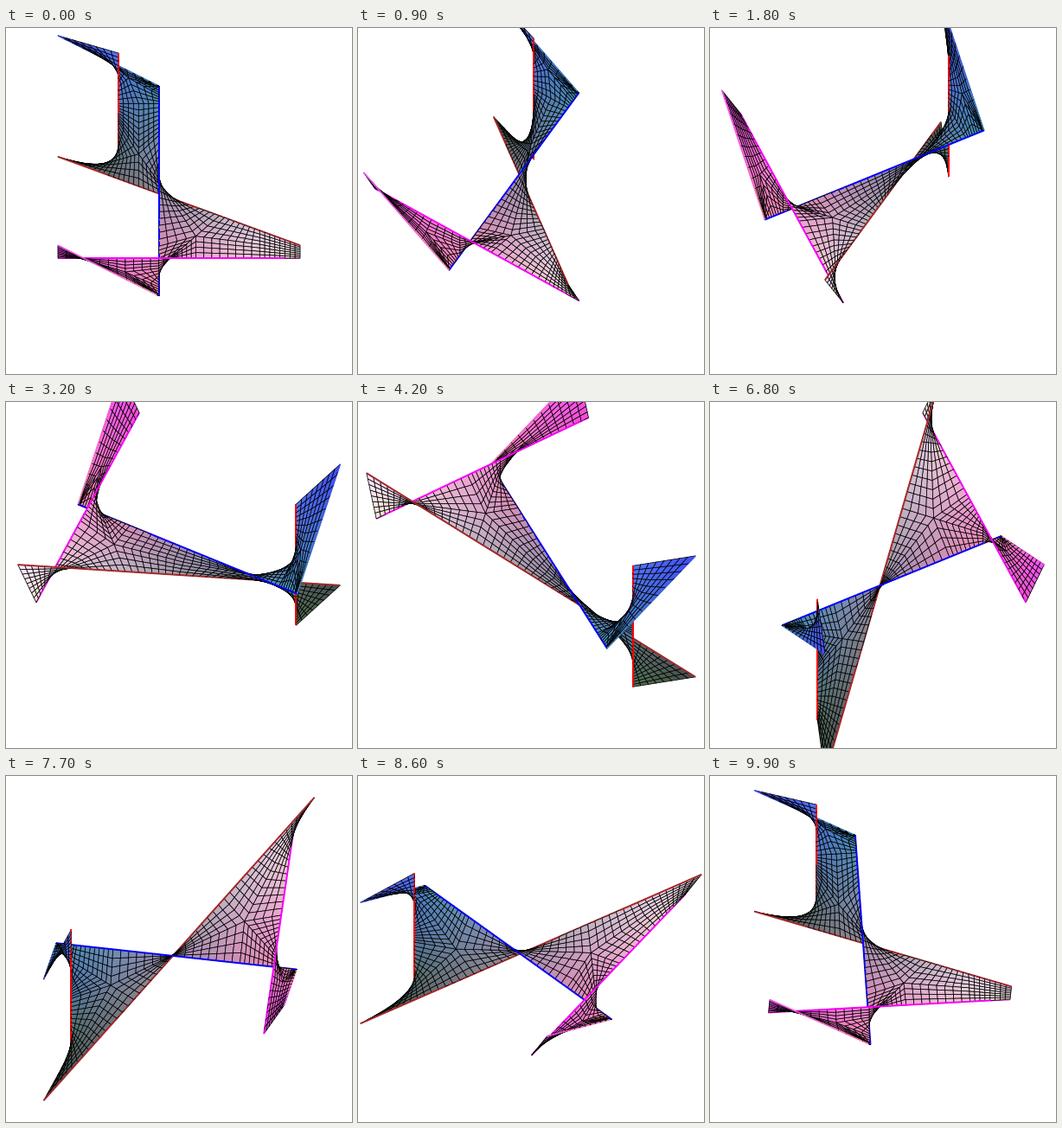
A matplotlib script for the animation above (10000 ms loop, 400 px wide and 400 px high).

```python
import numpy as np
import matplotlib.pyplot as plt
from matplotlib.animation import FuncAnimation
from matplotlib.collections import PolyCollection

FRAMES = 100
HALF = 140            # half cube edge in pixels
TILT = np.radians(60)
ROWS = 4              # mesh rows between a line and the middle of a patch

V = lambda *p: np.array(p, float)
third, sixth = 2 / 3, 1 / 6

# ends of the four skew lines
BROWN = V(-1, 1, -1), V(1, -1, 1)
BLUE = V(-sixth, 1, sixth), V(-sixth, -1, sixth)
PINK = V(-1, -5 / 6, .5), V(1, -5 / 6, .5)
RED = V(-.5, 5 / 6, -1), V(-.5, 5 / 6, 1)
CORNER = V(-1, -1, 1)

# nearest points between pairs of lines
blue_pink, pink_blue = V(-sixth, -5 / 6, sixth), V(-sixth, -5 / 6, .5)
pink_brown, brown_pink = V(third, -5 / 6, .5), V(third, -third, third)
brown_blue, blue_brown = V(0, 0, 0), V(-sixth, 0, sixth)


def flip(p):
    """Half turn that maps the configuration onto itself."""
    return -np.asarray(p)[..., ::-1]


def span(a, b, n):
    """n + 1 evenly spaced steps from a to b; a and b may be whole curves."""
    return np.linspace(a, b, n + 1)


def bend(a, mid, b, n, m):
    return np.vstack([span(a, mid, n), span(mid, b, m)[1:]])


def foot(p, a, b):
    """Nearest point to p on the line through a and b."""
    d = b - a
    return a + d * np.dot(p - a, d) / np.dot(d, d)


def star(sides, arms):
    """Three grids around a centre; arms[i] counts cells towards the gap after side i."""
    mids = [(sides[i][1] + sides[(i + 1) % 3][0]) / 2 for i in range(3)]
    centre = sum(mids) / 3
    grids = []
    for i, (a, b) in enumerate(sides):
        n, m = arms[i - 1], arms[i]
        edge = bend(a, foot(centre, a, b), b, n, m)
        spine = bend(mids[i - 1], centre, mids[i], n, m)
        grids.append(span(edge, spine, ROWS))
    return grids


def cells(grid):
    quads = np.stack([grid[:-1, :-1], grid[1:, :-1], grid[1:, 1:], grid[:-1, 1:]], 2)
    return quads.reshape(-1, 4, 3)


def build():
    middle = star([(brown_blue, brown_pink), (pink_brown, pink_blue),
                   (blue_pink, blue_brown)], (8, 8, 8))
    wing = star([(pink_blue, PINK[0]), (CORNER, BLUE[1]),
                 (BLUE[1], blue_pink)], (8, 4, 4))
    tail = span(span(pink_brown, PINK[1], 8), span(brown_pink, BROWN[1], 8), 2 * ROWS)
    quads = np.concatenate([cells(g) for g in middle + wing + [tail]])
    return np.concatenate([quads, flip(quads)])


def tint(p):
    x, y, z = np.moveaxis(p, -1, 0)
    rgb = np.stack([.26 + .74 * (1 - y) / 2,
                    .30 + .60 * (1 + x) / 2,
                    .30 + .70 * (1 + z) / 2], -1)
    return np.clip(rgb, 0, 1)


def pieces(a, b, n=50):
    p = span(a, b, n)
    return np.stack([p[:-1], p[1:], p[1:], p[:-1]], 1)


quads = build()
shape = [quads]
face_rgb = [tint(quads.mean(1))]
edge_rgb = [np.zeros((len(quads), 3))]
widths = [np.full(len(quads), .55)]
bias = [np.zeros(len(quads))]


def add(segs, rgb, width, lift):
    n = len(segs)
    shape.append(segs)
    face_rgb.append(rgb)
    edge_rgb.append(rgb)
    widths.append(np.full(n, width))
    bias.append(np.full(n, lift))


for rim in [(CORNER, BLUE[1]), (flip(CORNER), BLUE[0])]:
    segs = pieces(*rim)
    add(segs, tint(segs.mean(1)), 1.2, .02)
for ends, rgb in [(BROWN, (.65, .16, .16)), (BLUE, (0, 0, 1)),
                  (PINK, (1, 0, 1)), (RED, (1, 0, 0))]:
    segs = pieces(*ends)
    add(segs, np.tile(rgb, (len(segs), 1)), 1.4, .02)

shape, face_rgb, edge_rgb = map(np.concatenate, (shape, face_rgb, edge_rgb))
widths, bias = np.concatenate(widths), np.concatenate(bias)

fig = plt.figure(figsize=(4, 4), dpi=100, facecolor="white")
ax = fig.add_axes([0, 0, 1, 1])
ax.set(xlim=(0, 400), ylim=(400, 0))
ax.axis("off")
mesh = PolyCollection([])
ax.add_collection(mesh, autolim=False)


def draw(frame):
    turn = 2 * np.pi * frame / FRAMES
    x, y, z = np.moveaxis(shape, -1, 0)
    across = x * np.cos(turn) + y * np.sin(turn)
    back = y * np.cos(turn) - x * np.sin(turn)
    up = z * np.cos(TILT) + back * np.sin(TILT)
    near = (z * np.sin(TILT) - back * np.cos(TILT)).mean(1) + bias
    order = np.argsort(near)
    flat = np.stack([200 + HALF * across, 200 - HALF * up], -1)
    mesh.set_verts(flat[order])
    mesh.set_facecolor(face_rgb[order])
    mesh.set_edgecolor(edge_rgb[order])
    mesh.set_linewidth(widths[order])
    return mesh,


anim = FuncAnimation(fig, draw, frames=FRAMES, interval=100, repeat=True,
                     repeat_delay=0, blit=False)
plt.show()
```
